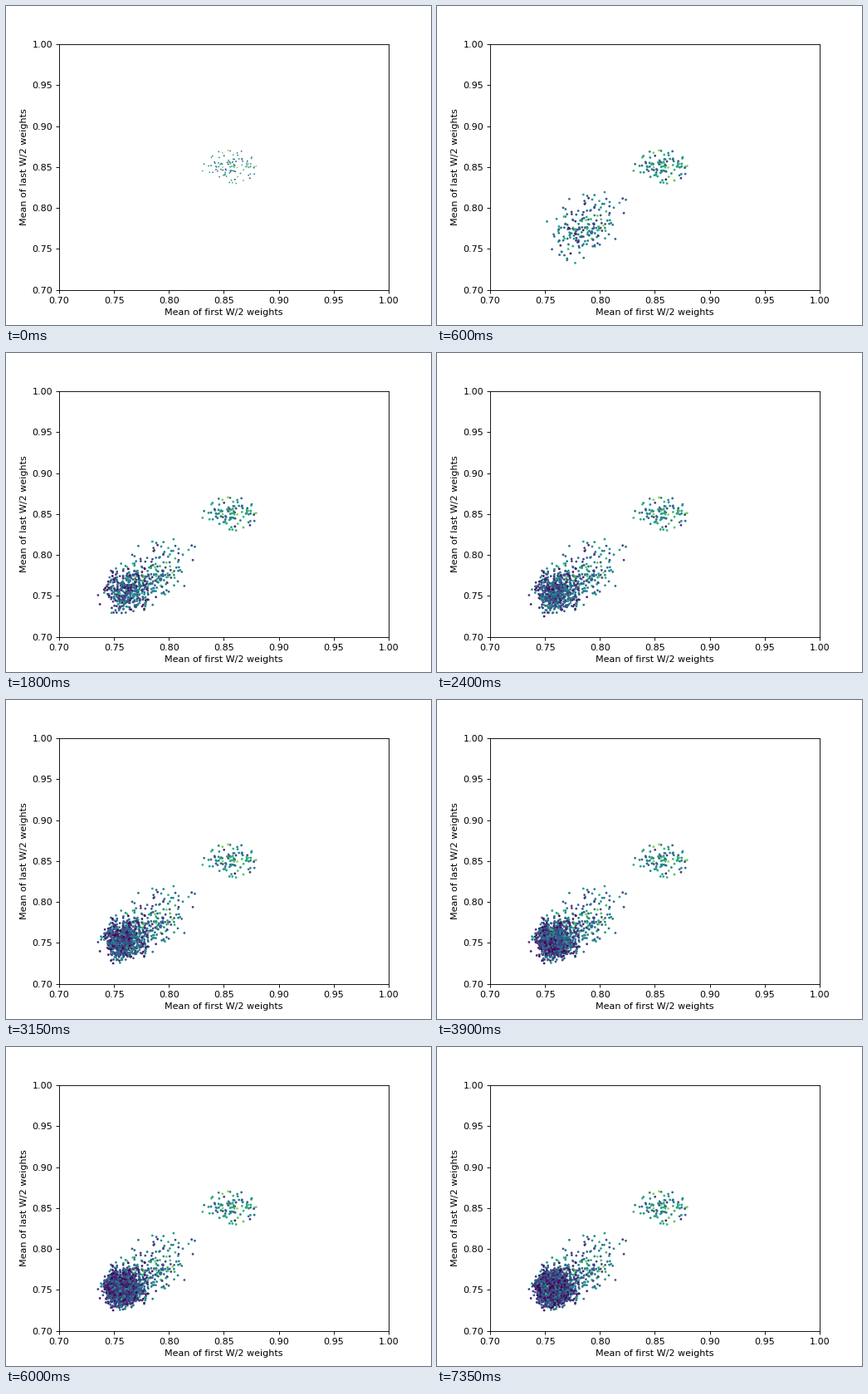
Write a matplotlib script that moves like this. It is 512 by 384 pixels and loops after 7.5 s.

```python
import numpy as np
import matplotlib.pyplot as plt
from matplotlib.animation import FuncAnimation

W, H, DPI = 512, 384, 80
FRAMES, STEP = 50, 150
LO, HI = 0.7, 1.0
FOUNDERS, CHILDREN = 100, 50

rng = np.random.default_rng(12)


def cloud(n, center, spread, reach):
    """Gaussian cloud cut off at `reach` standard deviations."""
    u = rng.random(n) * (1 - np.exp(-reach ** 2 / 2))
    r = np.sqrt(-2 * np.log(1 - u))
    a = rng.uniform(0, 2 * np.pi, n)
    return np.array(center) + np.array(spread) * np.c_[r * np.cos(a), r * np.sin(a)]


def generation(k):
    """Members born in step k: mean weights and fitness 0..1."""
    if k == 0:
        pos = cloud(FOUNDERS, (0.855, 0.850), (0.0115, 0.0095), 2.5)
        level = 0.48
    else:
        # Later broods converge on one point and scatter less
        drift = np.exp(-(k - 1) / 3.3)
        wide = np.exp(-k / 10)
        pos = cloud(CHILDREN, (0.757 + 0.041 * drift, 0.751 + 0.036 * drift),
                    (0.0065 + 0.0068 * wide, 0.0085 + 0.0075 * wide), 2.8)
        level = 0.18 + 0.24 * np.exp(-k / 12)
    return pos, np.clip(rng.normal(level, 0.17, len(pos)), 0, 0.85)


broods = [generation(k) for k in range(FRAMES)]
points = np.vstack([pos for pos, _ in broods])
colors = plt.cm.viridis(np.concatenate([fit for _, fit in broods]))

fig, ax = plt.subplots(figsize=(W / DPI, H / DPI), dpi=DPI)
ax.set(xlim=(LO, HI), ylim=(LO, HI),
       xlabel="Mean of first W/2 weights", ylabel="Mean of last W/2 weights")
dots = ax.scatter([], [], linewidths=0)


def update(k):
    n = FOUNDERS + CHILDREN * k
    dots.set_offsets(points[:n])
    dots.set_facecolor(colors[:n])
    dots.set_sizes([6.25 if k else 2.6], dpi=DPI)
    return dots,


anim = FuncAnimation(fig, update, frames=FRAMES, interval=STEP,
                     init_func=lambda: update(0), repeat=True, repeat_delay=0)
plt.show()
```
